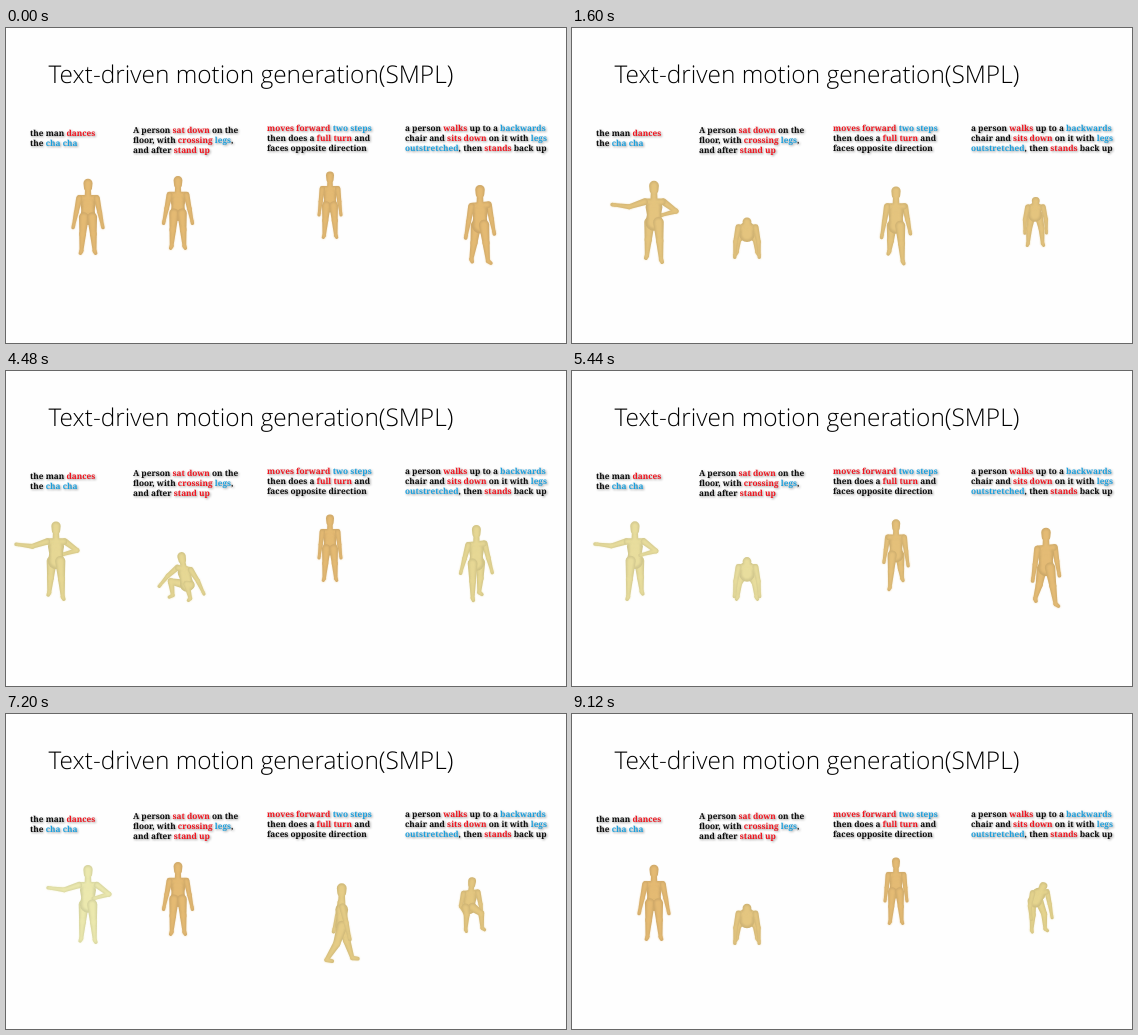
An HTML page with a canvas for the animation above (9280 ms loop, 560 by 315 pixels).

```html
<!DOCTYPE html>
<html lang="en">
<head>
<meta charset="utf-8">
<title>Text-driven motion generation</title>
<style>
  html, body { margin: 0; width: 100%; height: 100%; overflow: hidden; background: #fefefe; }
  canvas, svg { position: absolute; left: 0; top: 0; width: 560px; height: 315px; }
  text { text-rendering: geometricPrecision; white-space: pre; }
  .title { font: 300 24.45px "Open Sans", "Noto Sans", sans-serif; fill: #000; }
  .captions { font: 700 8.25px "Noto Serif", serif; fill: #0c0c0c;
    filter: drop-shadow(1px 1px 1px rgba(0, 0, 0, .42)); }
  .r { fill: #f0141e; }
  .b { fill: #1b9fdd; }
</style>
</head>
<body>
<canvas id="stage"></canvas>
<svg viewBox="0 0 560 315">
  <text class="title" x="42.5" y="55">Text-driven motion generation(SMPL)</text>
  <g class="captions">
    <text x="24" y="108">the man <tspan class="r">dances</tspan></text>
    <text x="24" y="118">the <tspan class="b">cha cha</tspan></text>

    <text x="127" y="105">A person <tspan class="r">sat down</tspan> on the</text>
    <text x="127" y="115">floor, with <tspan class="r">crossing</tspan> <tspan class="b">legs</tspan>,</text>
    <text x="127" y="125">and after <tspan class="r">stand up</tspan></text>

    <text x="261" y="103"><tspan class="r">moves forward</tspan> <tspan class="b">two steps</tspan></text>
    <text x="261" y="113">then does a <tspan class="r">full turn</tspan> and</text>
    <text x="261" y="123">faces opposite direction</text>

    <text x="399" y="103">a person <tspan class="r">walks</tspan> up to a <tspan class="b">backwards</tspan></text>
    <text x="399" y="113">chair and <tspan class="r">sits down</tspan> on it with <tspan class="b">legs</tspan></text>
    <text x="399" y="123"><tspan class="b">outstretched</tspan>, then <tspan class="r">stands</tspan> back up</text>
  </g>
</svg>
<script>
const LOOP = 9280, STEP = 160;
const { sin, cos, abs, max, min, PI, hypot } = Math;
const canvas = document.getElementById('stage');
const ctx = canvas.getContext('2d');
const ratio = window.devicePixelRatio || 1;
canvas.width = 560 * ratio;
canvas.height = 315 * ratio;

const mix = (a, b, k) => a + (b - a) * k;
const mixAll = (a, b, k) => a.map((v, i) => mix(v, b[i], k));
function ramp(t, from, to) {
  const u = min(1, max(0, (t - from) / (to - from)));
  return u * u * (3 - 2 * u);
}
// Rises from a to b, stays, falls from c to d.
const hold = (t, a, b, c, d) => ramp(t, a, b) - ramp(t, c, d);

// Each motion turns seconds since its start into a pose; angles in radians.
function dance(t) {
  const d = ramp(t, .2, .9), near = hold(t, .4, 1.4, 1.9, 2.9);
  return {
    x: 82 - 32 * hold(t, 2.4, 4.1, 4.7, 6.4) - 28 * ramp(t, 7.8, 9.1),
    ground: 227 + 3 * d + 6 * near,
    size: 1.03 + .03 * d + .05 * near,
    stride: .22 * d * sin(t * 4.4),
    left: { spread: mix(.2, 1.25, d), fold: -.45 * d },
    right: { spread: mix(.2, .9, d), fold: 2.2 * d, elbow: .3 * d },
  };
}

function sitOnFloor(t) {
  const down = hold(t, .5, 1.6, 5.1, 6.3), sit = hold(t, 2, 2.9, 4.6, 5.2);
  const arm = { spread: .2 + .6 * sit, fold: .15 * down, swing: .2 * down };
  return {
    x: 172 + 3 * ramp(t, .5, 1.6) + 6 * sit,
    ground: 222 + 9 * down + 3 * ramp(t, 5.1, 6.3),
    size: 1 + .03 * hold(t, .2, .7, 1.2, 1.8) - .04 * sit,
    yaw: -.6 * sit,
    lean: .95 * hold(t, .2, 1.4, 5.4, 6.4) - .65 * sit,
    hip: 1.5 * down + .4 * sit,
    knee: 2 * down + .2 * sit,
    left: arm, right: arm,
  };
}

function stepAndTurn(t) {
  const near = ramp(t, .3, 2.4) - .62 * ramp(t, 2.6, 3.6);
  const arm = { spread: .12 + .08 * near };
  return {
    x: 324 + 14 * ramp(t, 1.9, 3),
    ground: 211 + 39 * near,
    size: .91 + .21 * near,
    yaw: PI * ramp(t, 2.1, 3.3),
    stride: .35 * hold(t, .2, .7, 3.2, 3.7) * sin(t * 5),
    left: arm, right: arm,
  };
}

function sitOnChair(t) {
  const back = hold(t, 1, 1.6, 3.8, 4.9), down = hold(t, 1.2, 2, 3.5, 4.3);
  const stoop = hold(t, 1, 1.5, 1.7, 2.2) + hold(t, 3.3, 3.8, 3.9, 4.4);
  const arm = { spread: .22, fold: .4 * down, elbow: .9 * down };
  return {
    x: 474 - 11 * back,
    ground: 237 - 18 * back,
    size: 1.08 - .18 * back,
    yaw: .35 - .9 * hold(t, .7, 1.1, 1.3, 1.8),
    lean: .85 * stoop,
    hip: 1.35 * down,
    knee: 1.35 * down,
    stride: .25 * (1 - hold(t, 1, 1.4, 4, 4.4)) * sin(t * 5 + .5),
    left: arm, right: arm,
  };
}

const MOTIONS = [[dance, 9120], [sitOnFloor, 7200], [stepAndTurn, 4480], [sitOnChair, 5200]];

const TILT = .25;

// Bends the skeleton and returns the body as groups of tapered segments.
function buildBody({ yaw = 0, lean = 0, hip = 0, knee = 0, stride = 0, left, right }) {
  const project = ([x, y, z]) => {
    const depth = z * cos(yaw) - x * sin(yaw);
    return [x * cos(yaw) + z * sin(yaw), depth * sin(TILT) - y * cos(TILT), depth];
  };
  const spine = (height, x = 0) => [x, height * cos(lean), height * sin(lean)];
  const reach = ([x, y, z], length, side, out, forward) => [
    x + side * length * sin(out),
    y - length * cos(out) * cos(forward),
    z + length * cos(out) * sin(forward),
  ];
  const segment = (a, b, ra, rb) => ({ a: project(a), b: project(b), ra, rb });

  const limbs = [[-1, left], [1, right]].flatMap(([side, arm]) => {
    const { spread = .2, fold = 0, swing = 0, elbow = 0 } = arm;
    const shoulder = spine(19, side * 8.5);
    const armSwing = swing - side * stride * .7;
    const elbowAt = reach(shoulder, 14.5, side, spread, armSwing);
    const wrist = reach(elbowAt, 13, side, spread - fold, armSwing + elbow);
    const hand = reach(wrist, 2.5, side, spread - fold, armSwing + elbow);

    const thigh = hip + side * stride, out = .07 + .15 * hip;
    const shin = thigh - knee - max(0, -side * stride) * .9;
    const hipAt = [side * 4, 0, 0];
    const kneeAt = reach(hipAt, 17, side, out, thigh);
    const ankle = reach(kneeAt, 17, side, .07, shin);
    const toe = [ankle[0] + side, ankle[1] - 1, ankle[2] + 5];
    return [
      [segment(hipAt, kneeAt, 4.8, 3.2), segment(kneeAt, ankle, 3.3, 1.8), segment(ankle, toe, 2, 1.7)],
      [segment(shoulder, elbowAt, 3, 2.2), segment(elbowAt, wrist, 2.3, 1.5), segment(wrist, hand, 1.6, 1.7)],
    ];
  });
  const chest = mix(5.6, 7.6, abs(cos(yaw)));
  const torso = [
    segment(spine(19, -7.5), spine(19, 7.5), 3, 3),
    segment(spine(14), spine(7), chest, chest - 1.2),
    segment(spine(7), [0, 0, 0], chest - 1.2, chest + .1),
    segment(spine(20), spine(29), 3.2, 2.8),
    segment(spine(30), spine(34), 4, 4.4),
  ];
  const depth = group => group.reduce((sum, s) => sum + s.a[2] + s.b[2], 0) / group.length;
  return [torso, ...limbs].sort((a, b) => depth(a) - depth(b));
}

function drawSegment({ a, b, ra, rb }, girth) {
  const angle = Math.atan2(b[1] - a[1], b[0] - a[0]), q = PI / 2;
  ra *= girth;
  rb *= girth;
  ctx.beginPath();
  if (hypot(b[0] - a[0], b[1] - a[1]) <= abs(ra - rb)) {
    const end = ra > rb ? a : b;
    ctx.arc(end[0], end[1], max(ra, rb), 0, 2 * PI);
  } else {
    ctx.arc(a[0], a[1], ra, angle + q, angle + 3 * q);
    ctx.arc(b[0], b[1], rb, angle - q, angle + q);
  }
  ctx.fill();
}

// Skin drifts from orange through khaki to pale yellow during a motion.
const SKIN = [[225, 179, 109], [227, 209, 140], [234, 237, 184]];
function skin(tone, light) {
  const at = min(tone, .999) * 2, i = Math.floor(at);
  return `rgb(${mixAll(SKIN[i], SKIN[i + 1], at - i).map(c => min(255, Math.round(c * light)))})`;
}

function drawFigure(motion, t) {
  const pose = motion(t), tone = .08 + t * .11;
  const body = buildBody(pose);
  const lowest = max(...body.flat().map(s => s.b[1] + s.rb));
  ctx.save();
  ctx.translate(pose.x, pose.ground - lowest * pose.size);
  ctx.scale(pose.size, pose.size);
  for (const group of body) {
    ctx.filter = 'none';
    ctx.fillStyle = skin(tone, .91);
    group.forEach(s => drawSegment(s, 1));
    ctx.filter = `blur(${ratio}px)`;
    ctx.fillStyle = skin(tone, 1.01);
    group.forEach(s => drawSegment(s, .7));
  }
  ctx.restore();
}

let shown = -1;
function frame(now) {
  const t = Math.floor((now % LOOP) / STEP) * STEP;
  if (t !== shown) {
    shown = t;
    ctx.setTransform(ratio, 0, 0, ratio, 0, 0);
    ctx.clearRect(0, 0, 560, 315);
    for (const [motion, period] of MOTIONS) drawFigure(motion, (t % period) / 1000);
  }
  requestAnimationFrame(frame);
}
frame(performance.now());
</script>
</body>
</html>
```
